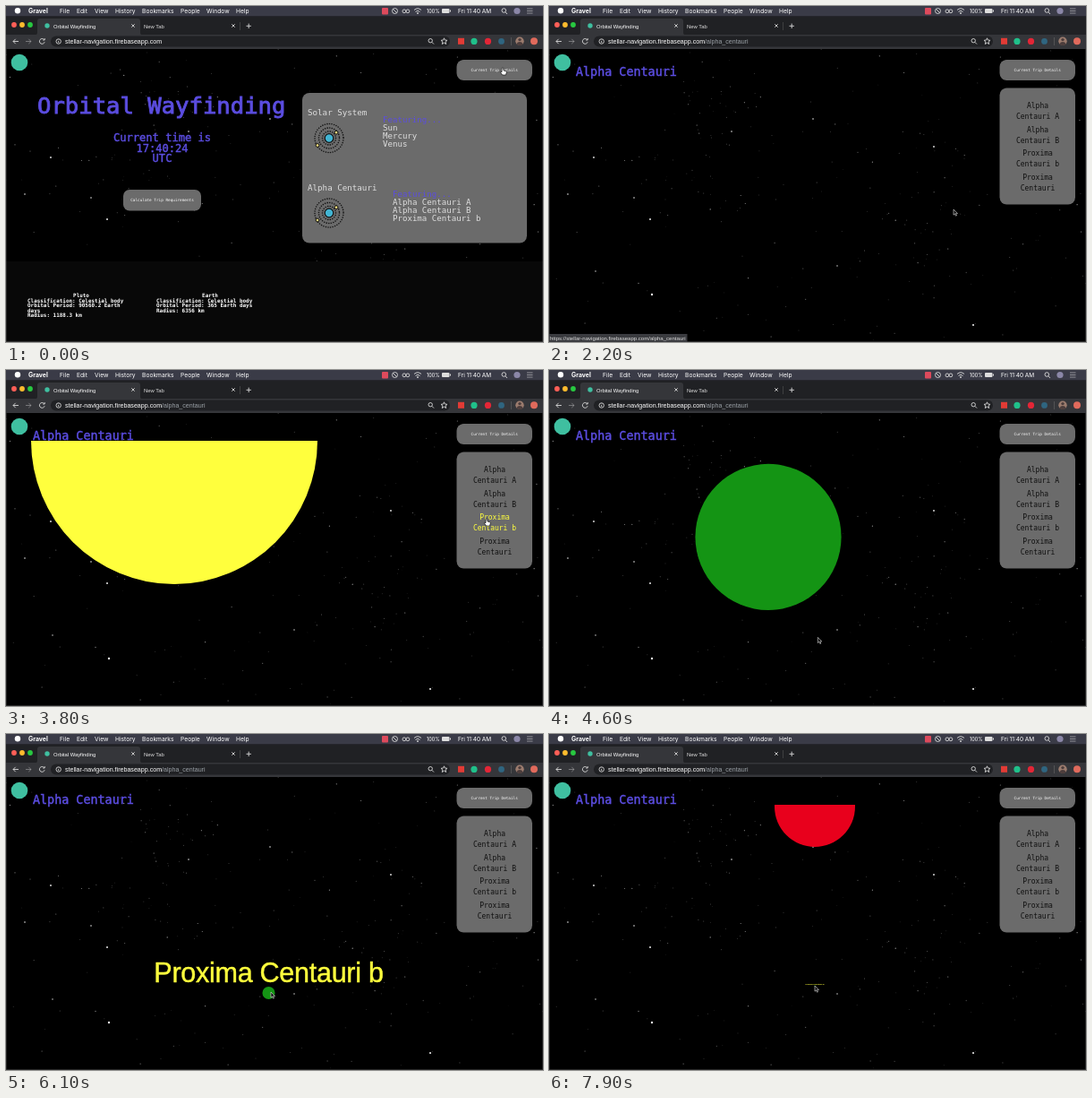
Animation of 600x375 px, one loop 8000 ms. Source, as an HTML page:

```html
<!DOCTYPE html>
<html lang="en">
<head>
<meta charset="utf-8">
<title>Orbital Wayfinding</title>
<style>
html, body { margin: 0; width: 100%; height: 100%; overflow: hidden; background: #000; }
svg { display: block; width: 600px; height: 375px; }
text { white-space: pre; fill: #fff; font-family: 'Liberation Sans', Arial, sans-serif; }
.ui { font-family: Inter, sans-serif; }
.mono { font-family: 'DejaVu Sans Mono', monospace; }
.mid { text-anchor: middle; }
.bold { font-weight: bold; }
.purple { fill: #5b4de0; }
.heavy { stroke: #5b4de0; stroke-width: .035em; }
.pale { fill: #dedede; }
.dark { fill: #101010; }
.dim { fill: #9aa0a6; }
.line { fill: none; stroke: #d8d8d8; stroke-width: .9; }
.label { fill: #ffff3d; stroke: #ffff3d; stroke-width: .015em; letter-spacing: -.009em; }
#hover.on text { fill: #ffff3d; }
</style>
</head>
<body>
<svg id="stage" viewBox="0 0 600 375"></svg>
<script>
const YELLOW = '#ffff3d', GREY = '#6b6b6b', TEAL = '#3fbfa0';
const text = (x, y, size, str, cls = '', id = '') =>
  `<text x="${x}" y="${y}" font-size="${size}" class="${cls}" id="${id}">${str}</text>`;
const rect = (x, y, w, h, fill, rx = 0) =>
  `<rect x="${x}" y="${y}" width="${w}" height="${h}" rx="${rx}" fill="${fill}"/>`;
const dot = (x, y, r, fill, more = '') => `<circle cx="${x}" cy="${y}" r="${r}" fill="${fill}" ${more}/>`;
const line = (d, more = '') => `<path class="line" d="${d}" ${more}/>`;
const lines = (x, y, step, size, rows, cls) =>
  rows.map((s, i) => text(x, y + i * step, size, s, cls)).join('');

function stars() {
  let seed = 11, out = '';
  const rnd = () => (seed = seed * 16807 % 2147483647) / 2147483647;
  const spread = () => (rnd() + rnd() + rnd() - 1.5) * 60;
  const star = (x, y) => {
    out += dot(x.toFixed(1), y.toFixed(1), (.3 + rnd() * .35).toFixed(2), '#fff',
      `opacity="${(.15 + rnd() * .5).toFixed(2)}"`);
  };
  for (let i = 0; i < 190; i++) star(rnd() * 600, 48 + rnd() * 327);
  for (const [x, y] of [[165, 180], [180, 112], [420, 256]])
    for (let i = 0; i < 30; i++) star(x + spread(), y + spread());
  for (const [x, y, r] of [[50, 169, .9], [113, 238, 1], [115, 322, 1.2], [474, 356, 1.1], [430, 157, .9],
    [295, 126, .8], [95, 214, .8], [204, 140, .8], [21, 210, .8], [52, 296, .7], [322, 290, .7]])
    out += dot(x, y, r, '#e8e8e8');
  return out;
}

function menuBar() {
  const items = [[60, 'File'], [79, 'Edit'], [99, 'View'], [122, 'History'], [152, 'Bookmarks'],
    [195, 'People'], [224, 'Window'], [257, 'Help']];
  return rect(0, 0, 600, 11.5, '#3a3b47') + dot(13, 5.3, 3.2, '#fff') +
    text(25, 8, 6.9, 'Gravel', 'ui bold') +
    items.map(([x, s]) => text(x, 8, 6.7, s, 'ui')).join('') +
    rect(420, 2, 7, 7.5, '#dd4a5c', 1) +
    line('M431.5 5.5a3 3 0 1 0 6 0a3 3 0 1 0-6 0M432.5 3.5l4 4M443 5.8a1.9 1.9 0 1 0 3.8 0a1.9 1.9 0 1 0-3.8 0M447 5.8a1.9 1.9 0 1 0 3.8 0a1.9 1.9 0 1 0-3.8 0') +
    line('M456 4.5q4-3.5 8 0M457.5 6.4q2.5-2.2 5 0') + dot(460, 8, .9, '#ddd') +
    text(470, 8, 5.5, '100%', 'ui') + rect(487, 3, 8.5, 5, '#ddd', 1) + rect(496, 4.5, 1, 2, '#ddd') +
    text(505, 8, 6.5, 'Fri 11:40 AM', 'ui') +
    line('M554 5a2.3 2.3 0 1 0 4.6 0a2.3 2.3 0 1 0-4.6 0M558 6.8l2 2.2') +
    dot(571, 5.5, 3.6, '#8b87a8') + line('M582 3h6.5M582 5.5h6.5M582 8h6.5', 'opacity=".6"');
}

function browser() {
  const cross = (x, y) => line(`M${x - 1.7} ${y - 1.7}l3.4 3.4m0-3.4l-3.4 3.4`);
  return rect(0, 11.5, 600, 21, '#202124') +
    '<path d="M32 32.5q3 0 3-3V17q0-3 3-3H147q3 0 3 3V29.5q0 3 3 3Z" fill="#35363a"/>' +
    dot(9, 21, 2.9, '#ff5f57') + dot(18, 21, 2.9, '#febc2e') + dot(27, 21, 2.9, '#28c840') +
    dot(46, 22, 2.7, TEAL) + text(53, 24.5, 5.8, 'Orbital Wayfinding') + cross(142, 22) +
    text(154, 24.5, 5.9, 'New Tab', 'pale') + cross(254, 22) +
    rect(261, 18, .6, 9, '#555') + line('M268.5 22.3h5.4m-2.7-2.7v5.4') +
    rect(0, 32, 600, 16, '#35363a') + rect(50, 33.5, 446, 12, '#202124', 6) +
    line('M14 39.5h-6m2.7-2.7l-2.7 2.7l2.7 2.7') +
    line('M22 39.5h6m-2.7-2.7l2.7 2.7l-2.7 2.7', 'opacity=".45"') +
    line('M42.6 37.6a2.9 2.9 0 1 0 .5 2.6M43.2 36v2h-2') +
    line('M56 39.5a2.7 2.7 0 1 0 5.4 0a2.7 2.7 0 1 0-5.4 0M58.7 39v2M58.7 37.7v.5', 'stroke-width=".6"') +
    '<text x="66" y="41.7" font-size="7.1">stellar-navigation.firebaseapp.com<tspan class="dim" id="path">/alpha_centauri</tspan></text>' +
    line('M472 38.7a2.2 2.2 0 1 0 4.4 0a2.2 2.2 0 1 0-4.4 0M475.8 40.3l2.2 2.2') +
    line('M489.5 35.8l1 2.3 2.5.2-1.9 1.7.6 2.5-2.2-1.4-2.2 1.4.6-2.5-1.9-1.7 2.5-.2Z', 'stroke-width=".7"') +
    rect(505, 35.8, 7, 7, '#e23b35') + dot(523, 39.4, 3.6, '#20c08a') +
    dot(538.5, 39.4, 3.6, '#e32636') + dot(553.5, 39.4, 3.4, '#2f6580') +
    rect(564, 35, .6, 9, '#666') + dot(574, 39.3, 4.7, '#9c7c6e') +
    '<path d="M570.5 42.4a3.6 3.2 0 0 1 7 0a4.7 4.7 0 0 1-7 0Z" fill="#4c3d3c"/>' +
    dot(574, 37.6, 1.7, '#4c3d3c') + dot(590, 39.3, 4, '#e06a5c');
}

const system = y => [7.5, 11.5, 16].map(r => dot(361, y, r, 'none',
    'stroke="#111" stroke-width="1.6" stroke-linecap="round" stroke-dasharray="0 2.6"')).join('') +
  dot(361, y, 4.8, '#42b4d2', 'stroke="#111" stroke-width="1.2"') +
  dot(369, y - 6.3, 1.9, '#f2dc7c', 'stroke="#111"') + dot(348, y + 8, 1.9, '#f2dc7c', 'stroke="#111"');

function home() {
  const facts = 'mono bold';
  return text(35, 120, 25.6, 'Orbital Wayfinding', 'mono purple heavy') +
    lines(174.5, 151, 11.7, 12.1, ['Current time is', '17:40:24', 'UTC'], 'mono mid purple heavy')
      .replace('id="">17', 'id="clock">17') +
    rect(131, 205, 87, 23.5, GREY, 7) +
    text(174.5, 218.3, 4.35, 'Calculate Trip Requirements', 'mono mid') +
    rect(331, 97, 251, 167.5, GREY, 8) +
    text(337, 122, 9.2, 'Solar System', 'mono pale') + system(147.5) +
    text(421, 130, 9.1, 'Featuring...', 'mono purple') +
    lines(421, 138.7, 9, 9.1, ['Sun', 'Mercury', 'Venus'], 'mono pale') +
    text(337, 206, 9.2, 'Alpha Centauri', 'mono pale') + system(231) +
    text(432, 213, 9.1, 'Featuring...', 'mono purple') +
    lines(432, 222, 9, 9.1, ['Alpha Centauri A', 'Alpha Centauri B', 'Proxima Centauri b'], 'mono pale') +
    `<g id="trip">${rect(0, 285, 600, 90, '#080808')}` +
    text(84, 325, 5.95, 'Pluto', facts + ' mid') +
    lines(24, 330.6, 5.5, 5.95, ['Classification: Celestial body', 'Orbital Period: 90560.2 Earth', 'days', 'Radius: 1188.3 km'], facts) +
    text(228, 325, 5.95, 'Earth', facts + ' mid') +
    lines(168, 330.6, 5.5, 5.95, ['Classification: Celestial body', 'Orbital Period: 365 Earth days', 'Radius: 6356 km'], facts) + '</g>';
}

function systemPage() {
  const names = [['Alpha', 'Centauri A'], ['Alpha', 'Centauri B'], ['Proxima', 'Centauri b'], ['Proxima', 'Centauri']];
  return text(30, 78, 13.4, 'Alpha Centauri', 'mono purple heavy') +
    '<g clip-path="url(#view)">' + dot(188, 79, 160, YELLOW, 'id="sun"') +
    `<g id="planet">${dot(0, 0, 10, '#149414')}` + dot(0, -3466, 780, '#e8001c') +
    text(0, -16.4, 43.2, 'Proxima Centauri b', 'mid label') + '</g></g>' +
    rect(503.5, 91.5, 84.5, 130, GREY, 8) +
    names.map((n, i) => `<g id="${i == 2 ? 'hover' : ''}">` +
      lines(546, 114 + i * 26.5, 12, 8, n, 'mono mid dark') + '</g>').join('');
}

const status = rect(0, 366, 154.5, 9, '#3a3b3f') +
  text(1, 372.6, 6.05, 'https://stellar-navigation.firebaseapp.com/alpha_centauri', 'pale');
const arrow = '<path id="arrow" d="M0 0V6.2L1.5 4.9L2.5 7.2L3.5 6.8L2.5 4.6H4.5Z" fill="#111" stroke="#ddd" stroke-width=".6"/>';
const hand = '<path id="hand" d="M-.8-2q.8-1 1.5 0L1 1L3.6 1.7Q4.5 2 4.3 3L3.5 6H-.3L-2.8 2.8Q-2.5 1.6-1 2.8Z" fill="#fff" stroke="#111" stroke-width=".7"/>';

stage.innerHTML = '<clipPath id="view"><rect x="28" y="79" width="473" height="296"/></clipPath>' +
  rect(0, 0, 600, 375, '#000') + stars() +
  `<g id="home">${home()}</g><g id="system">${systemPage()}</g>` +
  dot(15, 63, 9.3, TEAL) + rect(503.5, 60, 84.5, 23, GREY, 8) +
  text(545.7, 73.2, 4.35, 'Current Trip Details', 'mono mid') +
  browser() + menuBar() + line('M.25 48V374.7H599.7V48', 'opacity=".25"') +
  `<g id="status">${status}</g><g id="cursor">${arrow}${hand}</g>`;

const $ = id => document.getElementById(id);
const show = (id, on) => { $(id).style.display = on ? '' : 'none'; };
const within = (t, a, b) => t >= a && t < b;

// Finds the pair of keys around t and how far along it is.
function span(keys, t) {
  let i = 1;
  while (i < keys.length - 1 && t >= keys[i][0]) i++;
  const a = keys[i - 1], b = keys[i];
  return [a, b, Math.min(1, Math.max(0, (t - a[0]) / (b[0] - a[0])))];
}
const mix = (a, b, p) => a + (b - a) * p;

const pointer = [[0, 555, 71], [850, 555, 71], [1250, 463, 207], [1750, 463, 207], [2200, 452, 227],
  [2600, 452, 227], [3300, 537, 168], [4050, 537, 168], [4450, 303, 298], [5000, 288.5, 300],
  [5400, 288.5, 300], [5900, 296, 288], [6300, 296, 288], [6700, 297, 281], [8000, 297, 281]];
// time, x, y, radius of the planet
const zoom = [[4100, 188, 79, 160], [4450, 188, 79, 160], [5050, 296.3, 283, 11], [5300, 296.3, 283, 11],
  [5900, 293.5, 289, 7.07], [6250, 293.5, 289, 7.07], [7850, 297, 281, .577]];

function draw(t) {
  const paged = t >= 1950;
  show('home', !paged);
  show('system', paged);
  show('path', paged);
  show('trip', t < 1000);
  show('status', within(t, 1600, 2600));
  show('sun', within(t, 2700, 4100));
  show('planet', t >= 4100);
  $('clock').textContent = '17:40:' + (24 + Math.floor((t + 800) / 1000));
  $('hover').setAttribute('class', within(t, 3220, 4110) ? 'on' : '');

  const pointing = t < 900 || within(t, 1200, 1950) || within(t, 3200, 4110);
  show('hand', pointing);
  show('arrow', !pointing);
  let [a, b, p] = span(pointer, t);
  p = p * p * (3 - 2 * p);
  $('cursor').setAttribute('transform', `translate(${mix(a[1], b[1], p)} ${mix(a[2], b[2], p)})`);

  // Position linear in radius: a zoom about a fixed point.
  [a, b, p] = span(zoom, t);
  const r = a[3] * (b[3] / a[3]) ** p;
  const q = a[3] === b[3] ? 0 : (r - a[3]) / (b[3] - a[3]);
  $('planet').setAttribute('transform',
    `translate(${mix(a[1], b[1], q)} ${mix(a[2], b[2], q)}) scale(${r / 10})`);
}

const start = performance.now();
(function tick() {
  draw((performance.now() - start) % 8000);
  requestAnimationFrame(tick);
})();
</script>
</body>
</html>
```
